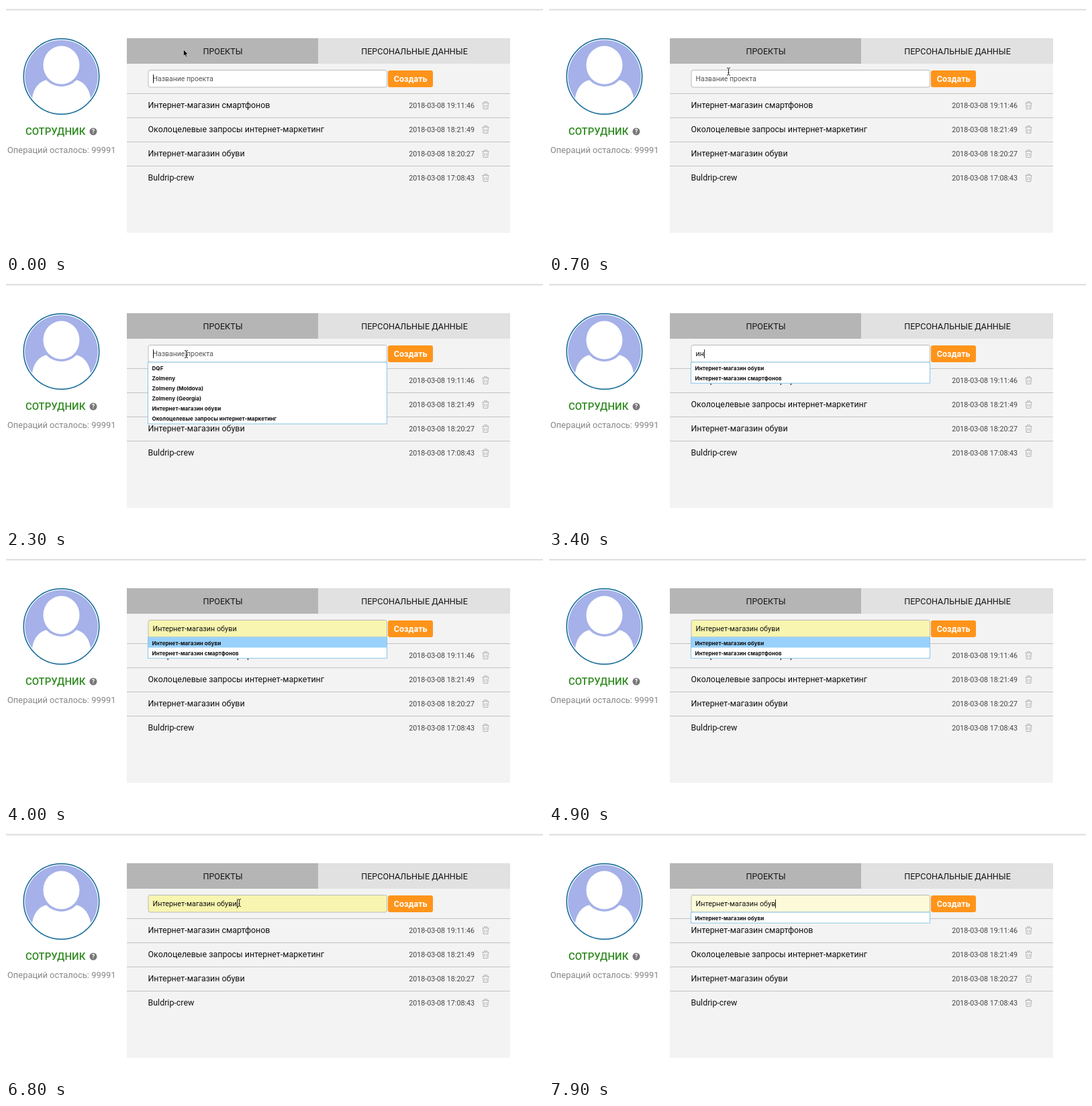
An HTML page that plays this animation: 800x368 px, repeating every 8 s.

```html
<!DOCTYPE html>
<html lang="ru">
<head>
<meta charset="utf-8">
<style>
  html, body { margin: 0; width: 100%; height: 100%; overflow: hidden; background: #fff; }
  svg { display: block; width: 100%; height: 100%; font-family: Roboto, sans-serif; }
  .tab { font-size: 12.55px; text-anchor: middle; fill: #161616; }
  .row { font-size: 12.45px; fill: #111; }
  .date { font-size: 10.7px; text-anchor: end; fill: #444; }
  .trash { fill: none; stroke: #b4b4b4; }
  .menu text { font: 700 8.1px Inter, sans-serif; fill: #111; }
</style>
</head>
<body>
<svg id="stage" viewBox="0 0 800 368">
  <rect y="4" width="800" height="1" fill="#efefef"/>
  <rect y="5" width="800" height="1.3" fill="#d9d9d9"/>
  <rect y="6.3" width="800" height="1" fill="#f2f2f2"/>

  <clipPath id="disc"><circle cx="82.5" cy="105" r="54.3"/></clipPath>
  <circle cx="82.5" cy="105" r="56.2" fill="#fff" stroke="#0b6594" stroke-width="1.5"/>
  <g clip-path="url(#disc)">
    <rect x="26" y="48" width="113" height="113" fill="#a5b1e8"/>
    <path d="M38 162V145C39 126 47 113 61 110H104C118 113 126 126 127 145V162Z" fill="#fff"/>
    <ellipse cx="82.5" cy="88" rx="31" ry="32" fill="#a5b1e8"/>
    <ellipse cx="82.5" cy="88" rx="27" ry="28.5" fill="#fff"/>
  </g>
  <text x="29" y="192" font-size="15" font-weight="500" fill="#2f8a20">СОТРУДНИК</text>
  <circle cx="130" cy="187" r="5.5" fill="#777"/>
  <text x="130" y="190.3" font-size="9" font-weight="700" text-anchor="middle" fill="#fff">?</text>
  <text x="2" y="219" font-size="12.9" fill="#868686">Операций осталось: 99991</text>

  <rect x="180" y="48" width="571" height="290" fill="#f3f3f3"/>
  <rect x="180" y="48" width="285" height="38" fill="#b5b5b5"/>
  <rect x="465" y="48" width="286" height="38" fill="#e1e1e1"/>
  <text class="tab" x="323" y="71.5">ПРОЕКТЫ</text>
  <text class="tab" x="608.5" y="71.5">ПЕРСОНАЛЬНЫЕ ДАННЫЕ</text>
  <g id="rows"></g>

  <rect id="field" x="212" y="95.5" width="355.5" height="25.5" rx="3" stroke="#b9b9b9"/>
  <text id="value" x="218.5" y="112"></text>
  <rect id="caret" y="102" width="1" height="13" fill="#222"/>
  <rect x="569" y="96" width="67" height="25" rx="3" fill="#ff941a"/>
  <text x="602.7" y="113.2" font-size="12.6" font-weight="700" text-anchor="middle" fill="#fff">Создать</text>

  <g id="menu" class="menu"></g>
  <path id="arrow" d="M0 0V9.5L2.1 7.6L3.6 11L5.2 10.3L3.7 7H6.6Z" fill="#000" stroke="#fff" stroke-width=".5"/>
  <path id="beam" d="M-2.5 -5.5Q0 -5.5 0 -4Q0 -5.5 2.5 -5.5M0 -4V4M-2.5 5.5Q0 5.5 0 4Q0 5.5 2.5 5.5M-1.2 1.5H1.2" fill="none" stroke="#222"/>
</svg>
<script>
const LOOP = 8000, STEP = 100;
const $ = id => document.getElementById(id);
const SHOES = 'Интернет-магазин обуви';
const PHONES = 'Интернет-магазин смартфонов';
const QUERIES = 'Околоцелевые запросы интернет-маркетинг';
const HINT = 'Название проекта';

$('rows').innerHTML = [
  [PHONES, '19:11:46'],
  [QUERIES, '18:21:49'],
  [SHOES, '18:20:27'],
  ['Buldrip-crew', '17:08:43']
].map(([name, time], i) => `<g transform="translate(0 ${i * 36})">
  <path d="M180 130.5H751" stroke="#c3c3c3"/>
  <text class="row" x="211.5" y="152.2">${name}</text>
  <text class="date" x="698" y="152">2018-03-08 ${time}</text>
  <path class="trash" d="M709.5 144.5H719.5M712.5 144V142.5H716.5V144M710.5 145L711.2 153.5H717.8L718.5 145M713 147V151.5M716 147V151.5"/>
</g>`).join('');

const ALL = ['DQF', 'Zolmeny', 'Zolmeny (Moldova)', 'Zolmeny (Georgia)', SHOES, QUERIES];
const MATCHES = [SHOES, PHONES];

// Each state holds until the next one starts.
const states = [
  { at: 0, text: '', items: [], caret: true },
  { at: 1000, text: '', items: ALL, caret: true },
  { at: 2500, text: 'и', items: MATCHES, caret: true },
  { at: 3000, text: 'ин', items: MATCHES, caret: true },
  { at: 3600, text: SHOES, items: MATCHES, picked: true, filled: true },
  { at: 6400, text: SHOES, items: [], caret: true, filled: true },
  { at: 7800, text: SHOES.slice(0, -1), items: [SHOES], caret: true, fading: true }
];

// Pointer stops: time, x, y
const pointerPaths = [
  [[0, 264.5, 65], [300, 264.5, 65], [900, 268.5, 109], [2400, 268.5, 109]],
  [[5000, 372, 118], [5500, 357.5, 111.5], [6300, 357.5, 111.5], [6700, 347.5, 107], [7700, 347.5, 107]]
];

const ease = p => p * p * (3 - 2 * p);
const mix = (a, b, p) => a + (b - a) * p;

function pointerAt(t) {
  const path = pointerPaths.find(p => t >= p[0][0] && t <= p[p.length - 1][0]);
  if (!path) return null;
  const i = Math.max(1, path.findIndex(stop => stop[0] >= t));
  const [t0, x0, y0] = path[i - 1], [t1, x1, y1] = path[i];
  const p = ease((t - t0) / (t1 - t0));
  return [mix(x0, x1, p), mix(y0, y1, p)];
}

function menuMarkup({ items, picked }) {
  if (!items.length) return '';
  const pitch = 15.15, height = items.length * pitch + 1;
  return `<rect x="211.5" y="121" width="356" height="${height}" fill="#fff" stroke="#8ac6e6"/>`
    + (picked ? `<rect x="212" y="121.3" width="355" height="${pitch}" fill="#98d1fc"/>` : '')
    + items.map((item, i) => `<text x="217.5" y="${132.6 + i * pitch}">${item}</text>`).join('');
}

function place(id, pos, shown) {
  $(id).style.display = shown ? '' : 'none';
  if (shown) $(id).setAttribute('transform', `translate(${pos})`);
}

let current;
function showState(state) {
  if (state === current) return;
  current = state;
  const value = $('value');
  value.textContent = state.text || HINT;
  value.setAttribute('font-size', state.text ? 10.8 : 10.5);
  value.setAttribute('fill', state.text ? '#111' : '#555');
  const width = state.text ? value.getComputedTextLength() : 0;
  $('caret').setAttribute('x', Math.round(218.5 + width));
  $('menu').innerHTML = menuMarkup(state);
}

function render(t) {
  const state = states.filter(s => s.at <= t).pop();
  const age = t - state.at;
  showState(state);
  const yellow = state.filled ? 1 : state.fading ? Math.max(0, 1 - age / 200) : 0;
  $('field').setAttribute('fill', `rgb(${mix(255, 248, yellow)} ${mix(255, 245, yellow)} ${mix(255, 176, yellow)})`);
  $('caret').style.display = state.caret && age % 1000 < 500 ? '' : 'none';

  const pos = pointerAt(t);
  const inField = pos && pos[1] > 95;
  place('arrow', pos, pos && !inField);
  place('beam', pos, inField);
}

const start = performance.now();
function tick(now) {
  const t = Math.max(0, now - start) % LOOP;
  render(Math.floor(t / STEP) * STEP);
  requestAnimationFrame(tick);
}
render(0);
requestAnimationFrame(tick);
</script>
</body>
</html>
```
